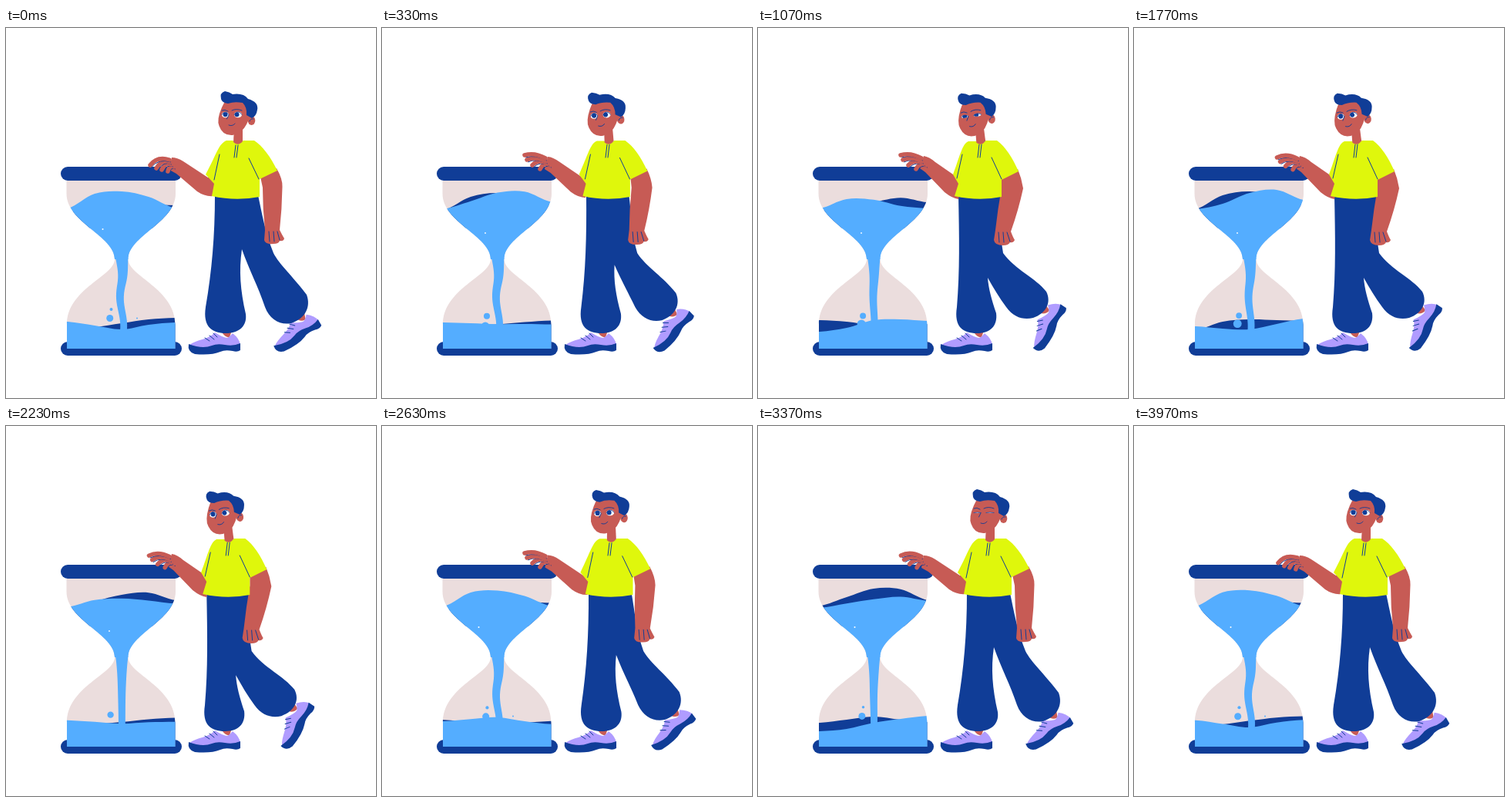
Write an HTML page with a canvas that moves like this. It is 480x480 px and loops after 4 s.

```html
<!DOCTYPE html>
<html lang="en">
<head>
<meta charset="utf-8">
<title>Waiting at the hourglass</title>
<style>
html, body { margin: 0; width: 100%; height: 100%; overflow: hidden; background: #fff; }
canvas { display: block; }
</style>
</head>
<body>
<canvas id="stage" width="480" height="480"></canvas>
<script>
const ctx = document.getElementById('stage').getContext('2d');
const LOOP = 4000, TAU = Math.PI * 2;
const NAVY = '#103d97', WATER = '#54adff', GLASS = '#ebdddd',
      SKIN = '#c75b55', LIME = '#dff70c', LILAC = '#b09cff';

const mix = (a, b, k) => a + (b - a) * k;
const clamp = x => Math.max(0, Math.min(1, x));
const smooth = x => x * x * (3 - 2 * x);

// Value of a [position, value] track at x
function track(keys, x, ease = smooth) {
  const i = keys.findIndex(k => k[0] > x);
  if (i < 0) return keys[keys.length - 1][1];
  if (i === 0) return keys[0][1];
  const [x0, a] = keys[i - 1], [x1, b] = keys[i];
  return mix(a, b, ease((x - x0) / (x1 - x0)));
}

// Blend two path strings of the same structure
function morph(a, b, k) {
  const to = b.match(/-?[\d.]+/g);
  let i = 0;
  return a.replace(/-?[\d.]+/g, n => mix(+n, +to[i++], k).toFixed(2));
}

const fill = (d, color) => {
  ctx.fillStyle = color;
  ctx.fill(new Path2D(d));
};
const line = (d, width = 1, color = NAVY) => {
  ctx.lineWidth = width;
  ctx.strokeStyle = color;
  ctx.stroke(new Path2D(d));
};
const oval = (x, y, rx, ry, color) => {
  ctx.fillStyle = color;
  ctx.beginPath();
  ctx.ellipse(x, y, rx, ry, 0, 0, TAU);
  ctx.fill();
};
const dot = (x, y, r, color) => oval(x, y, r, r, color);
function group(x, y, deg, px, py, draw) {
  ctx.save();
  ctx.translate(x, y);
  ctx.rotate(deg * Math.PI / 180);
  ctx.translate(-px, -py);
  draw();
  ctx.restore();
}

// ---------- hourglass ----------
const GLASS_PATH = 'M78.5 197 V215 C78.5 252 141 270 141 300 C141 322 79 338 79 385 V416 ' +
  'H219.5 V385 C219.5 338 158.5 322 158.5 300 C158.5 270 220 252 220 215 V197 Z';

// Surface heights at x = 80, 115, 150, 185, 220 for phases of the wave
const TOP_BACK = [[0, [240, 225, 220, 228, 230]], [.33, [235, 217, 212, 218, 230]],
  [.5, [233, 221, 209.5, 211, 226]], [.8, [237, 232, 226, 220, 226]]];
const TOP_FRONT = [[0, [234, 215, 212, 219, 234]], [.33, [235, 228, 214, 210, 223]],
  [.5, [236, 231, 225, 220.5, 226]], [.8, [234, 222, 223, 231, 234]]];
const LOW_BACK = [[0, [390, 388, 383, 378, 376]], [.325, [381, 384, 386, 385, 383]],
  [.535, [379, 381, 386, 388, 384]], [.685, [385, 381, 377, 381, 384]], [.885, [392, 381, 378, 379, 380]]];
const LOW_FRONT = [[0, [381, 386, 391, 385, 382]], [.325, [383, 380, 377.5, 383, 387]],
  [.535, [394, 389, 379, 378, 380]], [.685, [396, 393, 385, 380, 376]], [.885, [387, 390, 391, 384, 377]]];

function liquid(keys, phase, floor, color) {
  const cycle = [...keys, [1, keys[0][1]]];
  const ys = keys[0][1].map((_, i) => track(cycle.map(([p, v]) => [p, v[i]]), phase, k => k));
  const at = i => ys[Math.max(0, Math.min(4, i))];
  const slope = i => (at(i + 1) - at(i - 1)) / 6;
  let d = `M70 ${floor} V${ys[0]} L80 ${ys[0]}`;
  for (let i = 0; i < 4; i++) {
    const x = 80 + i * 35;
    d += ` C${x + 12} ${ys[i] + slope(i)} ${x + 23} ${ys[i + 1] - slope(i + 1)} ${x + 35} ${ys[i + 1]}`;
  }
  fill(d + ` H230 V${floor} Z`, color);
}

function stream(phase) {
  const sway = 1.4 + 1.4 * Math.cos(TAU * (phase - .12));
  const left = [], right = [];
  for (let y = 292; y <= 392; y += 4) {
    const c = 150.3 - sway * clamp((y - 295) / 40) * Math.cos(TAU * (y - 349) / 75);
    const w = 4.2 + 4.5 * Math.exp((295 - y) / 30);
    left.push(`${c - w} ${y}`);
    right.unshift(`${c + w} ${y}`);
  }
  fill('M' + left.concat(right).join('L') + 'Z', WATER);
}

const RISE = [[.4, 389], [.6, 384], [1, 376.5], [1.6, 373.5], [2, 365], [2.3, 362]];
const SIZE = [[.4, 5], [.6, 5.5], [1, 4.5], [1.6, 4], [2, 2], [2.25, 0]];

function hourglass(t) {
  const top = t / LOOP * 3 % 1, low = t / LOOP * 2 % 1, pop = t / LOOP * 6 % 1;
  ctx.fillStyle = NAVY;
  for (const y of [180, 407]) {
    ctx.beginPath();
    ctx.roundRect(71, y, 157, 18, 9);
    ctx.fill();
  }
  ctx.save();
  ctx.clip(new Path2D('M60 198 H240 V430 H60 Z'));
  ctx.clip(new Path2D(GLASS_PATH));
  ctx.fillStyle = GLASS;
  ctx.fillRect(70, 190, 160, 230);
  liquid(TOP_BACK, top, 260, NAVY);
  liquid(TOP_FRONT, top, 300, WATER);
  liquid(LOW_BACK, low, 420, NAVY);
  stream(top);
  liquid(LOW_FRONT, low, 420, WATER);
  for (const life of [pop, pop + 1, pop + 2]) {
    if (life > .4 && life < 2.25)
      dot(134 + 1.5 * clamp(life - .5) + clamp(life - 1), track(RISE, life), track(SIZE, life), WATER);
  }
  const near = pop > .8 || pop < .03;
  if (near) dot(170, 376.5, 1, WATER);
  if (near || pop < .2) dot(125.5, 261, 1, '#fff');
  else dot(134, 266, .9, '#fff');
  ctx.restore();
}

// ---------- character: each pair is [leaning back, leaning in] ----------
const PANTS = [
  'M271 217 C271 270 267 315 259 362 C255 388 268 396 285 396 C303 396 313 386 311 371 C304 340 302 315 306 287 ' +
  'C316 315 327 335 336 362 C342 378 356 386 370 383 C388 377 396 362 390 346 C372 322 354 306 347 292 C336 265 332 240 327 217 Z',
  'M260 217 C261 270 262 315 258 362 C254 388 266 396 284 396 C302 396 311 386 309 370 C303 352 299 338 298 324 ' +
  'C306 338 313 350 322 362 C332 376 345 379 357 376 C374 370 381 356 374 342 C360 324 334 314 318 292 C314 270 316 240 315 217 Z'];
const SHIRT = [
  'M286 146 C276 150 274 162 259 190 L270 202 L267 218 Q298 225 329 219 L329 196 L352 185 C343 167 333 153 322 146 L308 146 Q301 152 294 146 Z',
  'M273 147 C265 150 262 166 253 190 L260 202 L255 218 Q286 225 316 219 L316 197 L338 186 C330 168 321 154 310 146 L296 146 Q289 152 283 147 Z'];
const SEAMS = [
  'M277 164 L270 197 M315 169 L328 196 M298 152 L296 168 M301 152 L299 168',
  'M265 164 L258 195 M303 168 L316 196 M287 151 L285 168 M290 151 L288 168'];
const NEAR_ARM = [
  'M215 168 Q222 168 230 173 L262 194 L272 192 L269 218 Q258 219 248 212 L221 189 L212 184 Z',
  'M215 166 Q222 167 230 174 L256 192 L265 192 L260 222 Q252 221 242 213 L217 187 L210 182 Z'];
const FAR_ARM = [
  'M330 193 L351 182 Q359 196 358.5 206 Q358 235 355 262 Q359 270 361 273 Q360 277 355 276 Q354 280 347 280 Q336 281 335 275 L336 262 Q333 235 333 207 Z',
  'M316 194 L337 183 Q342 195 344 208 Q338 236 328 264 Q331 272 333 275 Q331 279 327 278 Q325 282 318 282 Q307 282 306 275 L308 262 Q311 235 316 207 Z'];
const KNUCKLES = [
  'M341 264 L342 277 M347 264 L348 277 M352 264 L355 275',
  'M312 265 L313 278 M318 265 L319 278 M323 265 L327 277'];
// Fingers: [resting, lifted]
const FINGERS = [
  ['M218 180 Q212 177 210 186', 'M218 178 Q210 173 205 183'],
  ['M215 177 Q207 173 202 184', 'M215 176 Q204 169 195 178'],
  ['M213 174 Q203 169 195 182', 'M213 173 Q198 166 188 171'],
  ['M212 171 Q196 166 187 178', 'M212 169 Q198 161 185 165']];

function shoe() {
  fill('M281 390 L294 390 L290 401 Q285 402 281 396 Z', SKIN);
  fill('M237 412 C248 403 262 405 271 395 Q282 402 287 402 Q291 400 294 396 Q303 403 304 411 L280 414 Q262 420 237 412 Z', LILAC);
  fill('M237 410 Q255 417 267 412 Q274 409 284 411 Q295 413 304 409 L304 418 Q300 421 294 419 Q284 417 278 420 Q266 425 245 423 Q235 420 237 410 Z', NAVY);
  line('M269 396 L274 401 M264 399 L270 404 M258 402 L264 406');
}

function head(open) {
  fill('M296 130 H307 V147 Q301 154 295 148 Z', SKIN);
  oval(318.5, 120, 4.8, 6, SKIN);
  fill('M284 95 L280 103 Q273 119 276.5 127 Q281 140 294 139 Q306 137 312 125 L318 112 L308 95 Z', SKIN);
  fill('M279 92 Q277 84 284 82 Q290 83 294 86 Q308 84 314 92 Q328 96 326 106 Q325 114 319 117 L312 113 Q313 103 307 97 Q296 95 288 98 Q280 97 279 92 Z', NAVY);
  for (const [x, y, rx, px] of [[284.5, 112.5, 4.5, 284.5], [301, 112.5, 5, 299.5]]) {
    const h = Math.max(.4, 3.8 * open);
    ctx.save();
    ctx.beginPath();
    ctx.ellipse(x, y, rx, h, 0, 0, TAU);
    ctx.clip();
    ctx.fillStyle = '#fff';
    ctx.fillRect(x - 6, y - 5, 12, 10);
    if (open > .15) dot(px, y - .3, 3, NAVY);
    ctx.restore();
    line(`M${x - rx} ${y} Q${x} ${y - 2 * h} ${x + rx} ${y}`, .8);
  }
  line('M280 107 Q284 105 288 108 M293 107 Q299 104 306 107 M289 113 L286.5 118 M289 126 Q294 128 297 124 M316 121 Q317 117 321 118', .9);
}

const LEAN = [[30, 0], [620, 1.06], [1000, 1], [2170, 1], [2870, 0]];
const NOD = [[30, 0], [640, 1.35], [1050, 1], [2170, 1], [2950, 0]];
const BLINKS = [1130, 3370];

function person(t) {
  const lean = track(LEAN, t), nod = track(NOD, t);
  const pose = pair => morph(pair[0], pair[1], lean);
  const step = Math.min(lean, 1);
  const lift = clamp(1 - Math.cos(TAU * t / 800));
  const open = Math.min(1, ...BLINKS.map(b => Math.abs(t - b) / 120));

  shoe();
  group(mix(384, 373, step), mix(376, 366, step), mix(-30, -57, step), 287, 397, shoe);
  fill(morph(PANTS[0], PANTS[1], step), NAVY);

  fill(pose(NEAR_ARM), SKIN);
  for (const [rest, up] of FINGERS) {
    const d = morph(rest, up, lift);
    group(1.5, 2.8, 0, 0, 0, () => line(d));
    line(d, 5.5, SKIN);
  }
  fill(pose(FAR_ARM), SKIN);
  line(pose(KNUCKLES));
  fill(pose(SHIRT), LIME);
  line(pose(SEAMS));
  group(301 - 12 * lean, 146, -7.5 * nod, 301, 146, () => head(open));
}

function frame(now) {
  const t = now % LOOP;
  ctx.fillStyle = '#fff';
  ctx.fillRect(0, 0, 480, 480);
  ctx.lineCap = ctx.lineJoin = 'round';
  hourglass(t);
  person(t);
  requestAnimationFrame(frame);
}
const start = performance.now();
requestAnimationFrame(function first() {
  const tick = () => frame(Math.max(0, performance.now() - start));
  const raf = window.requestAnimationFrame.bind(window);
  tick.call();
});
</script>
</body>
</html>
```
